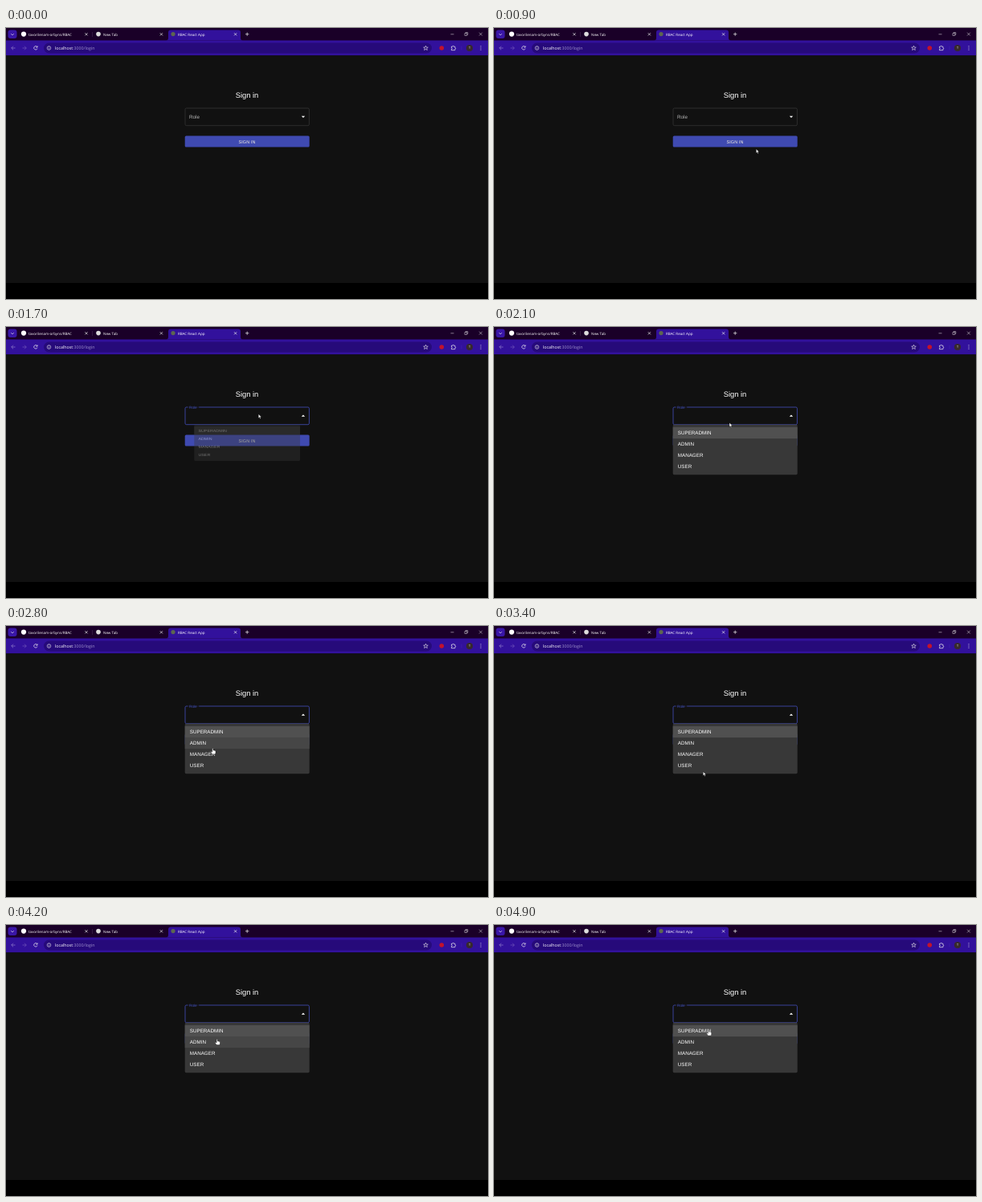
Write an HTML page that moves like this. It is 600 px wide and 338 px high and loops after 5000 ms.

```html
<!DOCTYPE html>
<html lang="en">
<head>
<meta charset="utf-8">
<title>Sign in</title>
<style>
  html, body { margin: 0; height: 100%; overflow: hidden; background: #000; }
  svg { display: block; width: 600px; height: 338px; }
  text { fill: #fff; font: 6.25px Arial, "Liberation Sans", sans-serif; text-rendering: geometricPrecision; }
  .ui text { font: 4.5px "Open Sans", sans-serif; }
  .ui .url { font-size: 5.27px; }
  .line { fill: none; stroke: #eee; stroke-width: .7; }
</style>
</head>
<body>
<svg viewBox="0 0 600 338">
  <g class="ui">
    <rect width="600" height="16" fill="#1a0028"/>
    <rect y="15.5" width="600" height="19" fill="#32119c"/>
    <path d="M199 15.6q3 0 3-3V5.5q0-3 3-3h84q3 0 3 3v7.1q0 3 3 3z" fill="#32119c"/>
    <rect x="2.5" y="2.5" width="11" height="10.5" rx="3" fill="#3a16a8"/>
    <rect x="47" y="18.5" width="483" height="13" rx="6.5" fill="#260a7a"/>

    <circle cx="22" cy="7.6" r="3.1" fill="#fff"/>
    <circle cx="115" cy="7.6" r="2.8" fill="#ddd"/>
    <circle cx="208" cy="7.6" r="2.6" fill="#5d6650"/>
    <text x="28" y="9.5">tavorilenam-orbyns/RBAC</text>
    <text x="121" y="9.5">New Tab</text>
    <text x="214" y="9.5">RBAC React App</text>
    <path d="M107.5 5v6" class="line" style="stroke:#4a3358;stroke-width:.5"/>

    <g class="line">
      <path d="M6.3 7.2 8 8.9 9.7 7.2"/>
      <path id="closers"/>
      <path d="M298 7.7h4.4M300.2 5.5v4.4"/>
      <path d="M553.5 7.8h4M571 6.6h2.8v2.8H571zM572 6.3v-.7h2.8v2.8h-.7M589 5.7l3.8 3.8M592.8 5.7 589 9.5" stroke-width=".5"/>
      <path d="M11.5 25H6.8M9 22.7 6.7 25 9 27.3" stroke="#9180cb"/>
      <path d="M20.5 25h4.7M23 22.7l2.3 2.3L23 27.3" stroke="#7058bb"/>
      <path d="M38.7 23.5A2.2 2.2 0 1 0 39 25.6M39.1 22.3v1.8h-1.8"/>
      <circle cx="53.5" cy="25" r="2.3" stroke-width=".6"/>
      <path d="M53.5 24.7v1.6M53.5 23.5v.6" stroke-width=".6"/>
      <path d="M522.5 22.2l.8 1.9 2 .1-1.6 1.3.6 2-1.8-1.1-1.8 1.1.6-2-1.6-1.3 2-.1z" stroke-width=".6"/>
      <path d="M554.5 23.2h1.4a.8.8 0 0 1 1.6 0h1.4v1.5a.8.8 0 0 1 0 1.6v1.4h-4.4v-1.4a.8.8 0 0 0 0-1.6z"/>
      <path d="M567 22.5v5" stroke="#4a2ab5" stroke-width=".5"/>
    </g>
    <text x="61" y="26.9" class="url">localhost<tspan fill="#a094cc">:3000/login</tspan></text>
    <circle cx="542.3" cy="25" r="2.8" fill="#c3122c"/>
    <circle cx="577" cy="25" r="4.1" fill="#37292c"/>
    <text x="577" y="26.3" text-anchor="middle" style="font-size:3.8px">T</text>
    <path d="M591 22.8h.01M591 25h.01M591 27.2h.01" stroke="#eee" stroke-width="1" stroke-linecap="round"/>
  </g>

  <rect y="34.3" width="600" height="283.7" fill="#111"/>
  <text x="300" y="87.2" text-anchor="middle" style="font-size:9.375px">Sign in</text>
  <rect id="field" x="223" y="100" width="154.4" height="21.7" rx="1.6" fill="none"/>
  <path id="notch" stroke="#111" stroke-width="1.4"/>
  <text id="label">Role</text>
  <path id="caret" fill="#fff"/>
  <rect id="button" x="222.7" y="134.4" width="155" height="14.2" rx="1.6"/>
  <text x="300" y="143.5" text-anchor="middle" style="font-size:5.47px;letter-spacing:.07px;fill:#f4efe2">SIGN IN</text>

  <g id="menu">
    <rect x="222.7" y="121.8" width="155" height="62.4" rx="1.6" fill="#383838"/>
    <rect x="222.7" y="125" width="155" height="14.06" fill="#505050"/>
    <rect id="hover" x="222.7" width="155" height="14.06" fill="#464646"/>
    <g id="items"></g>
  </g>

  <g id="cursor" fill="#fff" stroke="#000" stroke-width=".35" stroke-linejoin="round">
    <path id="arrow" d="M0 0v5l1.2-1.1.8 1.9.9-.4-.8-1.8h1.6z"/>
    <path id="hand" d="M-.6.6a.6.6 0 0 1 1.2 0v2q.8-.4 1.1.2.8-.3 1.1.3.9-.2.9.7v1.5q0 1-.6 2H-.6L-2.4 4.6q-.1-1 .9-.6l.9.7z"/>
  </g>
</svg>
<script>
const LOOP = 5000, STEP = 100, ROW = 14.06, MENU_TOP = 125, OPEN = 1500;
const $ = id => document.getElementById(id);
const clamp = v => Math.max(0, Math.min(1, v));
const show = (id, on) => $(id).setAttribute('visibility', on ? 'visible' : 'hidden');
function set(id, attrs) {
  for (const key in attrs) $(id).setAttribute(key, attrs[key]);
}

// Pointer path: time, x, y
const path = [
  [100, 345, 223], [300, 341, 215], [500, 335, 197], [1100, 322, 128],
  [1300, 319.6, 106], [1600, 319.6, 106], [2100, 293, 119.5], [2800, 257.3, 152.5],
  [3200, 258.5, 180], [3400, 260.3, 181.7], [3600, 261, 181], [3800, 261, 174],
  [4200, 262.7, 142.3], [4400, 264.5, 134], [4900, 267, 130.6]
];

function pointer(t) {
  const i = path.findIndex(p => p[0] >= t);
  if (i < 1) return path[i < 0 ? path.length - 1 : 0].slice(1);
  const [a, b] = [path[i - 1], path[i]];
  const k = (t - a[0]) / (b[0] - a[0]);
  return [a[1] + (b[1] - a[1]) * k, a[2] + (b[2] - a[2]) * k];
}

$('closers').setAttribute('d', [100, 193.4, 285.6]
  .map(x => `M${x - 1.6} 6.2l3.2 3.2m0-3.2l-3.2 3.2`).join(''));
$('items').innerHTML = ['SUPERADMIN', 'ADMIN', 'MANAGER', 'USER']
  .map((name, i) => `<text x="228.8" y="${134.2 + i * ROW}">${name}</text>`).join('');

function draw(t) {
  const [x, y] = pointer(t);
  const open = t >= OPEN;
  const shrink = clamp((t - OPEN) / 200);
  const grow = clamp((t - OPEN - 100) / 250);
  const row = grow > 0 ? Math.floor((y - MENU_TOP) / ROW) : -1;
  const onItem = row >= 0 && row < 4;
  const onField = !open && y > 100 && y < 122;
  const onButton = !open && y > 134.4 && y < 148.6;

  set('field', {
    stroke: open ? '#4450bd' : onField ? '#fff' : '#484848',
    'stroke-width': open ? .8 : .5
  });
  const gap = 7 * clamp(shrink * 2 - 1);
  set('notch', { d: `M${233.2 - gap} 100H${233.2 + gap}` });
  set('label', {
    transform: `translate(228 ${112.9 - 11.3 * shrink}) scale(${1 - shrink / 4})`,
    style: `fill:${shrink === 1 ? '#3f4db0' : '#b8b8b8'}`
  });
  set('caret', { d: open ? 'M367.8 111.8h4.4l-2.2-2.2z' : 'M367.8 109.8h4.4l-2.2 2.2z' });
  set('button', { fill: onButton ? '#303f9f' : '#3f4ab1' });

  const sx = .75 + .25 * grow;
  set('menu', {
    opacity: grow,
    transform: `translate(300 121.8) scale(${sx} ${sx * sx}) translate(-300 -121.8)`
  });
  show('hover', onItem && row > 0);
  set('hover', { y: MENU_TOP + Math.max(row, 0) * ROW });

  const pointing = onItem || onField || onButton;
  set('cursor', { transform: `translate(${x} ${y})`, opacity: t < 100 ? 0 : 1 });
  show('hand', pointing);
  show('arrow', !pointing);
}

function tick() {
  draw(Math.floor(performance.now() % LOOP / STEP) * STEP);
  requestAnimationFrame(tick);
}
tick();
</script>
</body>
</html>
```
